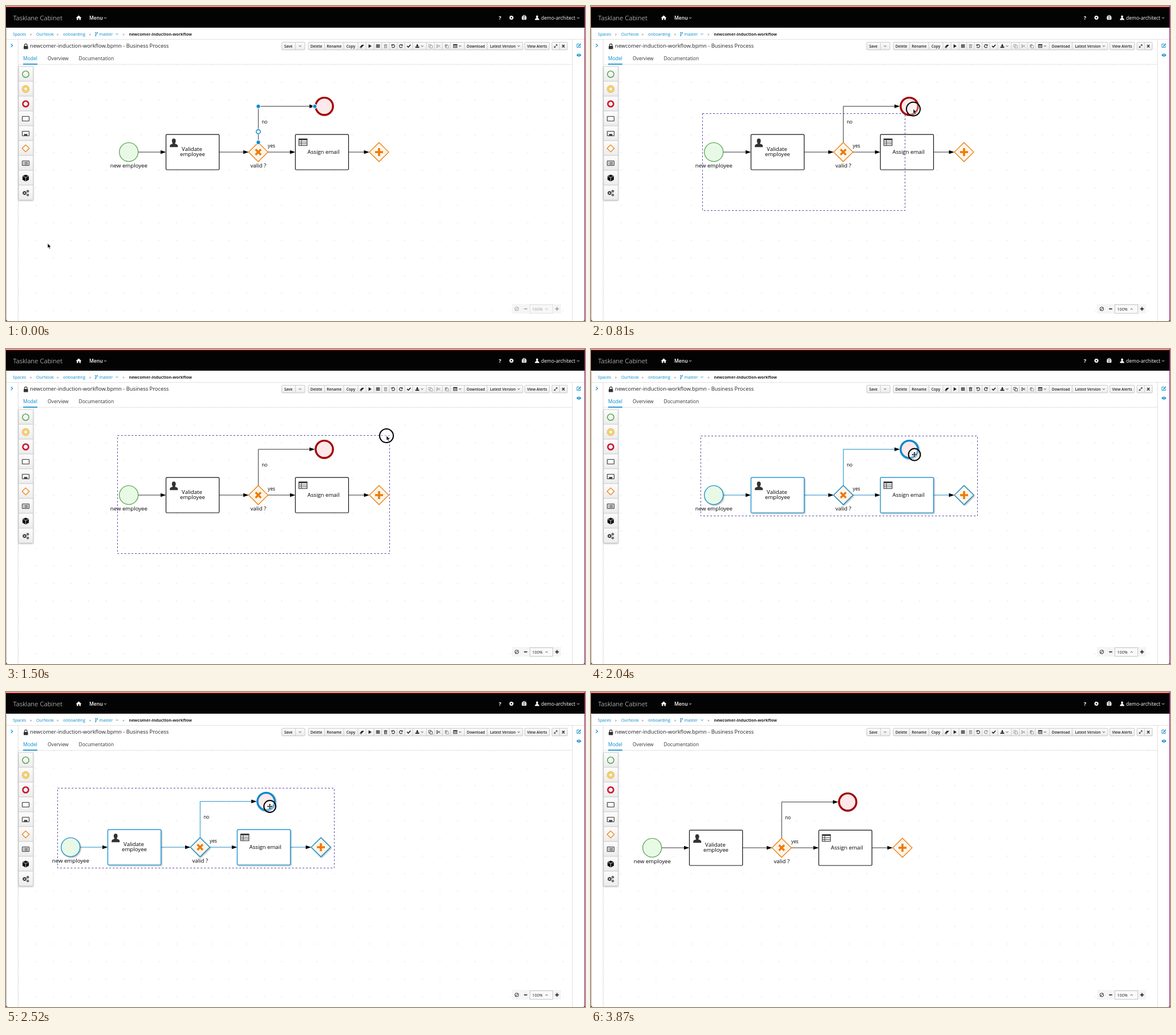
An HTML page for the animation above (3930 ms loop, 1015x552 px).

```html
<!DOCTYPE html>
<html lang="en">
<head>
<meta charset="utf-8">
<title>Process editor</title>
<style>
html, body { margin: 0; width: 100%; height: 100%; overflow: hidden; background: #fff; }
svg { display: block; width: 100%; height: 100%; }
text { font-family: "Open Sans", "Noto Sans", sans-serif; white-space: pre; }
.mid { text-anchor: middle; }
.line { fill: none; stroke-linecap: round; stroke-linejoin: round; }
#flow { --wire: #333; }
#flow.on { --wire: #1c8ac7; }
#flow.on .node { --edge: #0088ce !important; filter: url(#shade); }
</style>
</head>
<body>
<svg id="stage" viewBox="0 0 1015 552" xmlns="http://www.w3.org/2000/svg">
  <defs>
    <linearGradient id="btn" x2="0" y2="1"><stop stop-color="#fcfcfc"/><stop offset="1" stop-color="#ececec"/></linearGradient>
    <filter id="shade" x="-20%" y="-20%" width="150%" height="150%">
      <feDropShadow dx="1.2" dy="1.2" stdDeviation="1" flood-color="#000" flood-opacity=".35"/>
    </filter>
    <filter id="soft" x="-30%" y="-10%" width="160%" height="120%">
      <feDropShadow dx="0" dy="1" stdDeviation="1.5" flood-color="#000" flood-opacity=".35"/>
    </filter>
    <pattern id="dots" x="21" y="102.2" width="30.8" height="30.8" patternUnits="userSpaceOnUse">
      <rect width="1.2" height="1.2" fill="#d0d0d0"/>
    </pattern>
  </defs>
</svg>
<script>
const LOOP = 3930, STEP = 30;
const BLUE = '#0088ce', ORANGE = '#ec7a08';
const stage = document.getElementById('stage');
const $ = id => document.getElementById(id);

const text = (x, y, s, size, fill = '#222', more = '') =>
  `<text x="${x}" y="${y}" font-size="${size}" fill="${fill}" ${more}>${s}</text>`;
const mid = (x, y, s, size, fill, more = '') => text(x, y, s, size, fill, `class="mid" ${more}`);
const rect = (x, y, w, h, fill, more = '') =>
  `<rect x="${x}" y="${y}" width="${w}" height="${h}" fill="${fill}" ${more}/>`;
const disc = (x, y, r, fill, more = '') => `<circle cx="${x}" cy="${y}" r="${r}" fill="${fill}" ${more}/>`;
const line = (d, color = '#222', w = 1, more = '') =>
  `<path class="line" d="${d}" stroke="${color}" stroke-width="${w}" ${more}/>`;
const shape = (d, fill = '#222', more = '') => `<path d="${d}" fill="${fill}" ${more}/>`;
const at = (x, y, body, more = '') => `<g transform="translate(${x} ${y})" ${more}>${body}</g>`;
const caret = (x, y, color = '#333', s = 1.7) => line(`M${x - s} ${y - s / 2}l${s} ${s}l${s} ${-s}`, color, .9);
const bold = 'font-weight="600"';

const gear = (x, y, r, color) =>
  disc(x, y, r * .62, 'none', `stroke="${color}" stroke-width="${r * .5}"`) +
  disc(x, y, r * .92, 'none', `stroke="${color}" stroke-width="${r * .3}" stroke-dasharray="${r * .361} ${r * .361}"`);
const person = (color, s = 1) =>
  `<g transform="scale(${s})">` + `<ellipse cy="-3.4" rx="3.4" ry="4.2" fill="${color}"/>` +
  shape('M-7 7.4V5Q-6.6 2.6-2.2 1.6V0H2.2V1.6Q6.6 2.6 7 5V7.4Z', color) + '</g>';

function header() {
  return rect(0, 1, 1015, 37, '#030303') + rect(0, 1, 1015, 1.4, '#c00d12') +
    text(12.5, 25, 'Tasklane Cabinet', 11.5, '#f4f4f4', 'font-weight="300"') +
    shape('M122.8 20.7l4.7-4.3 4.7 4.3-.6.6-.7-.6V24.6h-2.4v-3h-2v3h-2.4v-3.9l-.7.6z', '#fff') +
    text(146, 23.6, 'Menu', 8.5, '#fff', bold) + caret(174, 21, '#fff') +
    mid(866, 24, '?', 9.5, '#fff', 'font-weight="700"') + gear(886, 20.5, 3.6, '#fff') +
    rect(904.3, 18, 8, 6, '#fff', 'rx="1"') + line('M906.3 18v-1.5h4v1.5', '#fff') + disc(908.3, 21, 1.6, '#fff', 'stroke="#000" stroke-width=".7"') +
    at(931, 20.5, person('#fff', .53)) +
    text(938, 23.6, 'demo-architect', 8.5, '#fff') + caret(1003, 21, '#fff');
}

function crumbs() {
  const sep = x => mid(x, 51.6, '»', 7, '#777');
  return text(12, 51.8, 'Spaces', 7.2, BLUE) + sep(43.5) + text(53, 51.8, 'OurNook', 7.2, BLUE) + sep(90.5) +
    text(100, 51.8, 'onboarding', 7.2, BLUE) + sep(147.5) +
    line('M157.3 46.8v5M160 46.8v1.3q0 1-2.7 2', BLUE, .8) + disc(157.3, 46.6, .9, BLUE) + disc(160, 46.6, .9, BLUE) + disc(157.3, 52, .9, BLUE) +
    text(163.5, 51.8, 'master', 7.2, BLUE) + caret(194.5, 49.4, BLUE) + sep(206) +
    text(215.5, 51.8, 'newcomer-induction-workflow', 7.2, '#222', 'font-weight="700"');
}

function frame() {
  return rect(0, 58, 1015, .8, '#ddd') + rect(20.8, 58, .8, 494, '#d4d4d4') + rect(992.6, 58, .8, 494, '#d4d4d4') +
    rect(21, 101.8, 972, .8, '#ddd') +
    line('M9 66.6l2.6 2.5-2.6 2.5', BLUE, 1.2) +
    rect(31, 70, 7.6, 5.6, '#333', 'rx=".8"') + line('M32.6 70v-1.4a2.2 2.2 0 0 1 4.4 0v1.4', '#333', 1.2) +
    text(42, 73.4, 'newcomer-induction-workflow.bpmn - Business Process', 9.35, '#222') +
    text(30, 95, 'Model', 8.5, BLUE) + text(73, 95, 'Overview', 8.5, '#333') + text(127.5, 95, 'Documentation', 8.5, '#333') +
    rect(30, 101, 25, 1.6, BLUE) +
    line('M1004.5 66.5h-3.6v6h6v-3', BLUE, .9) + line('M1003.4 70.6l4-4', BLUE, 1.4) +
    shape('M1000 86q4.3-5.4 8.6 0q-4.3 5.4-8.6 0z', BLUE) + disc(1004.3, 85.8, 1.7, '#fff') + disc(1004.3, 85.8, 1, BLUE);
}

function toolbar() {
  const box = (x, w) => rect(x, 63.6, w, 13.2, 'url(#btn)', 'stroke="#bbb" stroke-width=".8" rx="1"');
  const rules = xs => xs.map(x => rect(x - .4, 64, .8, 12.6, '#c4c4c4')).join('');
  const label = (x, s) => mid(x, 72.6, s, 6.55, '#222', bold);
  const icon = (x, body, id = '') => at(x, 70.2, body, id && `id="${id}"`);
  const turn = s => `<g transform="scale(${s} 1)">` + line('M-2 -1.7a2.7 2.7 0 1 1-.2 3.3', '#222', 1.1) + shape('M-3.2-3.4v3h3z') + '</g>';
  let grid = '';
  for (let i = 0; i < 9; i++) grid += rect(-3.2 + i % 3 * 2.3, -2.9 + (i / 3 | 0) * 2.1, 1.9, 1.6, '#222');
  const sheet = (x, y) => rect(x, y, 4, 4.5, '#fff', 'stroke="#333" stroke-width=".8"');
  return box(483.4, 40.6) + rules([507.5]) + label(495, 'Save') + caret(515.5, 70.3) +
    box(530, 376) + rules([558.5, 592, 617, 631, 645, 658.7, 672, 685.5, 699, 713, 737, 751, 765, 779, 803.5, 843.6]) +
    label(544, 'Delete') + label(575.3, 'Rename') + label(604.5, 'Copy') +
    icon(624, shape('M-3.8 1.8l3.6-4h4l-3.6 4zM-3.6 2.4h3.6v.8h-3.6z')) +
    icon(638, shape('M-2.4-3.2L3 0-2.4 3.2z')) + icon(652, grid) +
    icon(665.4, rect(-1.9, -1.7, 3.8, 4.7, 'none', 'stroke="#222" stroke-width=".8"') + line('M-2.8-2.3h5.6M-.8-3h1.6M-.7-.5v2.5M.7-.5v2.5', '#222', .7), 'trash') +
    icon(678.7, turn(1)) + icon(692.3, turn(-1), 'redo') +
    icon(706, line('M-2.5 .2l1.8 1.8 3.4-3.8', '#222', 1.6)) +
    icon(721, rect(-3.4, 1, 6.8, 2, '#222') + shape('M-1-3.2h2v2h1.6L0 1.4-2.6-1.2H-1z')) + caret(729.5, 70.3) +
    icon(744, sheet(-3, -3) + sheet(-.7, -1), 'copy') +
    icon(758, line('M-1.7-1.6L3 1.8M-1.7 1.6L3-1.8', '#222', .8) + disc(-2.4, -1.7, 1, 'none', 'stroke="#222" stroke-width=".8"') + disc(-2.4, 1.7, 1, 'none', 'stroke="#222" stroke-width=".8"'), 'cut') +
    icon(772.5, rect(-3, -3, 4.4, 5.4, '#444') + sheet(-.8, -1), 'paste') +
    icon(787.5, rect(-3.2, -2.7, 6.4, 5.4, '#fff', 'stroke="#222" stroke-width=".8"') + rect(-3.2, -2.8, 6.4, 1.6, '#222') + line('M-2 .2h4M-2 1.5h4', '#222', .6)) + caret(796, 70.3) +
    label(823.6, 'Download') + label(871, 'Latest Version') + caret(898.8, 70.3) +
    box(909.4, 43.4) + label(931, 'View Alerts') + box(957, 27) + rules([970.3]) +
    icon(963.6, line('M-2.2 2.2l4.4-4.4M.6-2.4h1.8v1.8M-2.4 .6v1.8h1.8', '#222', .9)) +
    icon(977, line('M-1.7-1.7l3.4 3.4M1.7-1.7l-3.4 3.4', '#222', 1.5));
}

function palette() {
  const ring = (r, c, w) => disc(0, 0, r, 'none', `stroke="${c}" stroke-width="${w}"`);
  const box = rect(-6, -4, 12, 8, '#fff', 'stroke="#333" stroke-width="1.1" rx=".8"');
  const icons = [
    ring(5.7, '#3f9c35', 1.3),
    ring(5.9, '#f0ab00', 1.2) + ring(3.5, '#f0ab00', 1.2),
    ring(5, '#c9182c', 2.6),
    box,
    box + rect(-3, .8, 6, 2.5, '#333'),
    shape('M0-6.2L6.2 0 0 6.2-6.2 0z', '#fff', `stroke="${ORANGE}" stroke-width="1.2"`),
    box + line('M-3.8-1.7h.6M-3.8 .2h.6M-3.8 2.1h.6M-1.6-1.7h5.4M-1.6 .2h5.4M-1.6 2.1h5.4', '#333', 1),
    shape('M0-6L5.6-3.5V3L0 6-5.6 3v-6.5z', '#111') + line('M-5-3.1L0-1 5-3.1M0-1V5.4', '#fff', .7),
    gear(-2, .2, 3.4, '#333') + gear(3.6, -3, 2.2, '#333') + gear(3.6, 3.6, 2.2, '#333')
  ];
  return rect(22, 106, 25.6, 234, '#f5f5f5', 'filter="url(#soft)"') +
    icons.map((body, i) => rect(22, 106 + i * 26, 25.6, 26, 'url(#btn)', 'stroke="#c8c8c8" stroke-width=".8"') +
      at(34.5, 119.5 + i * 26, body)).join('');
}

function diagram() {
  const wire = (d, x, y) => line(d, 'var(--wire)', 1) + shape(`M${x} ${y}l-9.5-3.2v6.4z`, '#000');
  const edge = (color, w) => `class="node" style="--edge:${color}" stroke="var(--edge)" stroke-width="${w}"`;
  const task = x => rect(x, 225.2, 93.2, 61.8, '#fff', 'rx="1.5" ' + edge('#111', 1.2));
  const gate = (x, mark) => shape(`M${x} 239.2l17 16.8-17 16.8-17-16.8z`, '#fef4e8', edge(ORANGE, 1.2)) + at(x, 256, mark);
  const plus = shape('M-1.8-7h3.6v5.2H7v3.6H1.8V7h-3.6V1.8H-7v-3.6h5.2z', ORANGE);
  const label = (x, y, s, size = 9.65) => mid(x, y, s, size, '#000');
  return wire('M232 256H275', 280.5, 256) + wire('M374 256H420', 425.5, 256) +
    wire('M459 256H502', 507.3, 256) + wire('M601 256H632', 637, 256) + wire('M442.3 239V175.8H536', 541.5, 175.8) +
    disc(215.2, 256, 16.5, '#e8fae6', edge('#4f9e47', 1.2)) +
    task(280.5) + at(294.2, 239.8, person('#333')) + task(507.3) +
    rect(513.4, 233, 14.4, 11.6, '#fff', 'stroke="#333" stroke-width="1.1"') + rect(513, 232.6, 15.2, 2.6, '#333') +
    line('M513.5 238.4h14M513.5 241.5h14M517.8 235v9.5', '#333', .9) +
    gate(442.2, `<g transform="rotate(45) scale(.95)">${plus}</g>`) + gate(654, plus) +
    disc(558, 175.8, 15.2, '#fde8ea', edge('#a30000', 3.4)) +
    label(215.4, 283.2, 'new employee') + label(326, 254.3, 'Validate') + label(327, 263.2, 'employee') +
    label(442.3, 283.2, 'valid ?') + label(556.6, 259.2, 'Assign email') +
    label(453.2, 205.8, 'no', 8.3) + label(465.4, 248.2, 'yes', 8.3);
}

function handles() {
  const knob = (x, y) => disc(x, y, 4.4, '#d6effb') + disc(x, y, 2.9, BLUE);
  return knob(442.3, 175.8) + knob(442.3, 239) + knob(541.3, 175.8) +
    disc(442.3, 220.2, 5, '#d6effb') + disc(442.3, 220.2, 3.5, '#fff', `stroke="${BLUE}" stroke-width="1.4"`);
}

function zoomBar() {
  return rect(887, 522, 86, 17, '#f5f5f5') + '<g id="zoom">' +
    disc(895.4, 530.8, 3.2, 'none', 'stroke="#222" stroke-width="1"') + line('M893.2 533l4.4-4.4', '#222', 1) +
    line('M908.7 530.8h4.4M963.2 530.8h5.4M965.9 528.1v5.4', '#111', 1.5) +
    rect(918.5, 523.5, 40, 15, '#fafafa', 'stroke="#bbb" stroke-width=".8"') +
    text(922.5, 533.5, '100%', 7.2, '#222') + line('M946 531.8l1.7-1.7 1.7 1.7', '#333', .9) + '</g>';
}

function pointer() {
  const cross = 'M0-3.6V3.6M-3.6 0H3.6';
  return disc(0, 0, 12, '#fff', 'id="ring" fill-opacity=".35" stroke="#000" stroke-width="2"') +
    '<g id="arrow">' + shape('M0 0V8.2L1.9 6.5 3.3 9.4 4.7 8.8 3.4 6H6z', '#000', 'stroke="#fff" stroke-width=".6"') + '</g>' +
    '<g id="cross">' + line(cross, '#fff', 2.8) + line(cross, '#000', 1.2) +
    shape('M0-4.5l1.5 1.9h-3zM0 4.5l1.5-1.9h-3zM-4.5 0l1.9 1.5v-3zM4.5 0l-1.9 1.5v-3z', '#000') + '</g>';
}

const dashed = 'stroke="#5548a8" stroke-width="1" stroke-dasharray="3.08"';
stage.insertAdjacentHTML('beforeend',
  rect(0, 0, 1015, 552, '#fff') + rect(21, 102.2, 971.5, 449.8, 'url(#dots)') +
  header() + crumbs() + frame() + toolbar() +
  `<g id="flow">${diagram()}${rect(192.5, 152.5, 485, 140, 'none', 'id="bounds" ' + dashed)}</g>` +
  `<g id="handles">${handles()}</g>` + rect(0, 0, 0, 0, 'none', 'id="marquee" ' + dashed) +
  palette() + zoomBar() +
  rect(0, 39, .8, 513, '#aaa') + rect(1014, 0, 1, 552, '#a0148c') +
  shape('M0 548Q0 552 4 552H0zM1015 548Q1015 552 1011 552H1015z', '#222') +
  `<g id="pointer">${pointer()}</g>`);

// Pointer path: time, x, y
const path = [
  [0, 73, 416], [210, 138, 386], [390, 196, 358], [480, 196, 358], [630, 398, 264],
  [780, 551, 189], [810, 565, 180.5], [1020, 638, 160], [1290, 688, 149], [1470, 673, 152],
  [1500, 667, 152], [1590, 661, 153], [1650, 660, 154], [1920, 567, 185], [2040, 567, 185],
  [2220, 528, 187], [2250, 516.5, 186.5], [2490, 465, 201], [2520, 462.5, 200.5], [2640, 459, 202],
  [3060, 459, 202], [3270, 445, 540], [3450, 445, 546], [3600, 445, 575], [LOOP, 445, 575]
];
const grabX = 567, grabY = 185;

function slope(i, k) {
  const a = path[i - 1], b = path[i], c = path[i + 1];
  if (!a || !c) return 0;
  const l = (b[k] - a[k]) / (b[0] - a[0]), r = (c[k] - b[k]) / (c[0] - b[0]);
  return l * r <= 0 ? 0 : 2 * l * r / (l + r);
}

function pointerAt(t) {
  let i = 0;
  while (i < path.length - 2 && path[i + 1][0] <= t) i++;
  const a = path[i], b = path[i + 1], d = b[0] - a[0], u = (t - a[0]) / d, v = 1 - u;
  return [1, 2].map(k => a[k] * v * v * (1 + 2 * u) + b[k] * u * u * (1 + 2 * v) +
    d * u * v * (slope(i, k) * v - slope(i + 1, k) * u));
}

const show = (id, on) => $(id).style.display = on ? '' : 'none';
const set = (id, values) => { for (const k in values) $(id).setAttribute(k, values[k]); };
const enable = (id, on) => $(id).style.opacity = on ? 1 : .5;
const crisp = v => Math.round(v) - .5;

function draw(t) {
  const [x, y] = pointerAt(t);
  const [lagX, lagY] = pointerAt(Math.max(0, t - STEP));
  const selecting = t >= 450 && t < 1650;
  const dragging = t >= 1980 && t < 2760;
  const selected = t >= 1650 && t < 3480;
  const crossed = t >= 1980 && t < 3090;

  let dx = 0, dy = 0;
  if (t >= 1980) [dx, dy] = t < 2700 ? [lagX - grabX, lagY - grabY] : [459 - grabX, 202 - grabY];
  set('flow', { transform: `translate(${dx} ${dy})`, class: selected ? 'on' : '' });
  show('bounds', selected);
  show('handles', t < 450);

  const left = 195.5, bottom = 358.5, right = crisp(lagX), top = crisp(lagY);
  show('marquee', selecting);
  set('marquee', { x: left, y: top, width: Math.max(0, right - left), height: Math.max(0, bottom - top) });

  set('pointer', { transform: `translate(${x} ${y})` });
  show('ring', selecting || dragging);
  set('ring', { r: dragging ? 10.4 : 12 });
  show('arrow', !crossed);
  show('cross', crossed);

  ['trash', 'copy', 'cut'].forEach(id => enable(id, selected));
  enable('paste', false);
  enable('redo', t < 3480);
  $('zoom').style.opacity = .4 + .6 * Math.min(1, Math.max(0, (t - 60) / 180));
}

function tick(now) {
  draw(Math.floor(now % LOOP / STEP) * STEP);
  requestAnimationFrame(tick);
}
draw(0);
requestAnimationFrame(tick);
</script>
</body>
</html>
```
